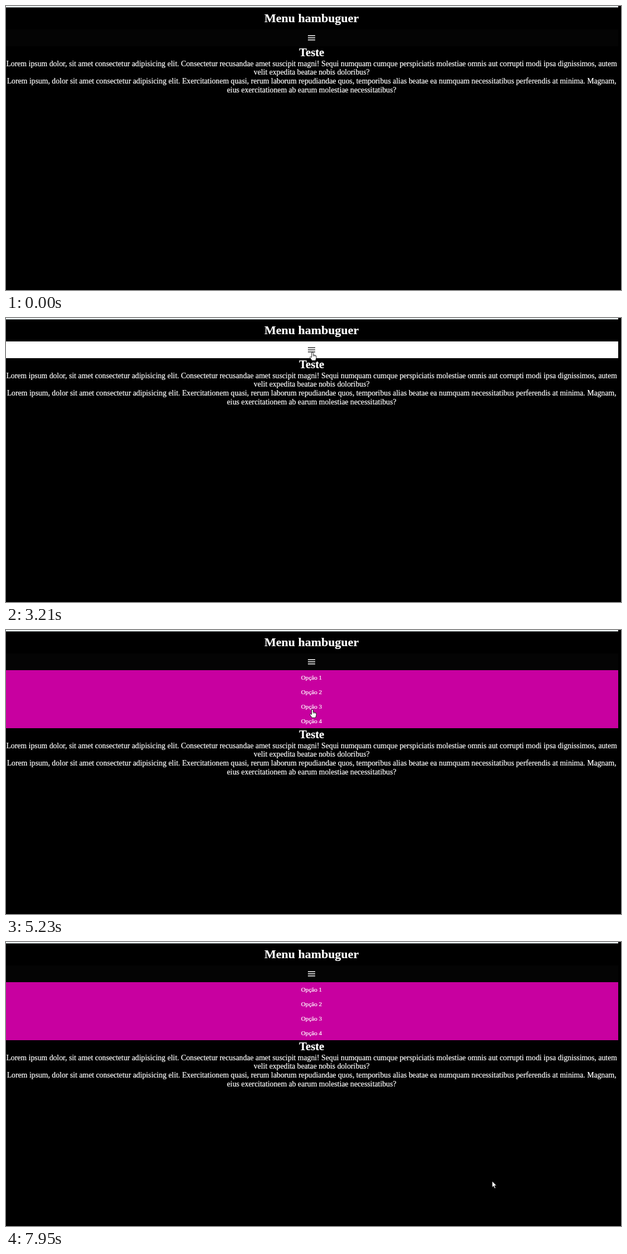
Write an HTML page that moves like this. It is 1100x509 px and loops after 8 s.

```html
<!DOCTYPE html>
<html lang="pt-BR">
<head>
<meta charset="utf-8">
<title>Menu</title>
<style>
  html, body { margin: 0; width: 100%; height: 100%; overflow: hidden; background: #000; }
  svg { display: block; }
  text { font: 13.72px "Liberation Serif", serif; fill: #fff; stroke: #fff; stroke-width: .22; text-anchor: middle; }
  .head { font-size: 20.56px; font-weight: bold; }
  .title { font-size: 21.94px; }
  #menu text { font-size: 11.14px; }
  #status text { font: 7.8px "Open Sans", sans-serif; fill: #3c4a52; stroke: none; text-anchor: start; }
  .pointer { fill: #fff; stroke: #000; stroke-width: .8; stroke-linejoin: round; }
</style>
</head>
<body>
<svg width="1100" height="509" viewBox="0 0 1100 509">
  <rect width="1095" height="2.5" fill="#eff6f9"/>
  <text class="head title" x="546.6" y="29.3">Menu hambuguer</text>
  <rect id="bar" y="42" width="1095" height="30"/>
  <path id="icon" d="M540 53.3h13M540 57h13M540 60.7h13" stroke-width="1.6"/>
  <g id="menu">
    <rect y="72" width="1095" height="104" fill="#c800a0"/>
  </g>
  <g id="content">
    <text class="head" x="546.7" y="90">Teste</text>
    <text x="546.7" y="107.6">Lorem ipsum dolor, sit amet consectetur adipisicing elit. Consectetur recusandae amet suscipit magni! Sequi numquam cumque perspiciatis molestiae omnis aut corrupti modi ipsa dignissimos, autem</text>
    <text x="546.7" y="123.3">velit expedita beatae nobis doloribus?</text>
    <text x="546.7" y="139">Lorem ipsum, dolor sit amet consectetur adipisicing elit. Exercitationem quasi, rerum laborum repudiandae quos, temporibus alias beatae ea numquam necessitatibus perferendis at minima. Magnam,</text>
    <text x="546.7" y="154.7">eius exercitationem ab earum molestiae necessitatibus?</text>
  </g>
  <g id="status">
    <path id="bubble" fill="#d3e6f1"/>
    <text id="link" x="1.2" y="505"></text>
  </g>
  <g id="cursor">
    <path id="arrow" class="pointer" d="M0 0V11.4L2.6 9 4.4 13.2 6.3 12.4 4.5 8.3H8Z"/>
    <g id="hand" class="pointer">
      <path d="M-1.5 1Q0-.7 1.3 1V5L5.5 6Q7 6.5 7 8V11L5.6 15.2H-.8L-4.6 9.6Q-4.2 7.4-1.5 9.6Z"/>
      <path d="M1.3 5V8M3.3 5.6V8M5.2 6V8" stroke-width=".6"/>
    </g>
  </g>
</svg>
<script>
const LOOP = 8000, STEP = 69;
const ENTER = 1750, PRESS = 3080, OPEN = 3280, LEAVE_BAR = 4470, LEAVE_LINKS = 6670;
const ROOT = 'file:///C:/Users/Mundo/OneDrive/Documentos/Clarinda/Dev/Feitos/';
const FULL = ROOT + 'menu-hamburguer/hamburguer-01/index.html#';
const SHORT = ROOT + '…/index.html#';

// Each move starts where the one before it ended
const moves = [
  { start: 70, end: 240, to: [802, 369] },
  { start: 510, end: 650, to: [566, 267] },
  { start: 910, end: 1680, to: [548, 73], sway: 40 },
  { start: ENTER, end: 1880, to: [549.5, 65] },
  { start: 2480, end: 2620, to: [548, 61] },
  { start: LEAVE_BAR, end: LEAVE_BAR, to: [550, 88] },
  { start: 4540, end: 5230, to: [548, 142] },
  { start: 5300, end: 6410, to: [553, 109] },
  { start: LEAVE_LINKS, end: 6870, to: [629, 195.5] },
  { start: 7140, end: 7480, to: [746, 460] },
  { start: 7880, end: 7950, to: [869.5, 428.5] }
];

const $ = id => document.getElementById(id);
const ramp = (t, a, b) => Math.min(1, Math.max(0, (t - a) / (b - a)));
const show = (id, on) => $(id).setAttribute('visibility', on ? 'visible' : 'hidden');
const gray = v => `rgb(${v},${v},${v})`;

for (let i = 0; i < 4; i++)
  $('menu').insertAdjacentHTML('beforeend', `<text x="546.5" y="${88.5 + 26 * i}">Opção ${i + 1}</text>`);

function cursorAt(t) {
  let x = 1110, y = 540;
  for (const { start, end, to, sway = 0 } of moves) {
    if (t < start) break;
    const steps = Math.round((end - start) / STEP) + 1;
    const p = Math.min(1, (Math.floor((t - start) / STEP + .1) + 1) / steps);
    x += (to[0] - x) * p + sway * Math.sin(2 * Math.PI * p);
    y += (to[1] - y) * p;
  }
  return [x, y];
}

function drawStatus(t) {
  const width = 366 + 61 * ramp(t, 6180, 6410);
  $('status').setAttribute('opacity', ramp(t, 5240, 5420) - ramp(t, 7200, 7400));
  $('bubble').setAttribute('d', `M0 495H${width - 3}q3 0 3 3V509H0Z`);
  $('link').textContent = t < 6200 ? SHORT : FULL;
}

function draw(t) {
  const hover = ramp(t, 1700, 1880) - ramp(t, LEAVE_BAR, LEAVE_BAR + 200);
  const pressed = t >= PRESS && t < OPEN;
  const opened = t >= OPEN;
  const pointing = t >= ENTER && t < LEAVE_LINKS;
  $('bar').setAttribute('fill', gray(Math.round(4 + 251 * hover)));
  $('icon').setAttribute('stroke', pressed ? '#333' : gray(Math.round(255 * (1 - hover))));
  show('menu', opened);
  $('content').setAttribute('transform', `translate(0 ${opened ? 104 : 0})`);
  show('hand', pointing);
  show('arrow', !pointing);
  $('cursor').setAttribute('transform', `translate(${cursorAt(t)})`);
  drawStatus(t);
}

const begin = performance.now();
function frame() {
  draw((performance.now() - begin) % LOOP);
  requestAnimationFrame(frame);
}
frame();
</script>
</body>
</html>
```
